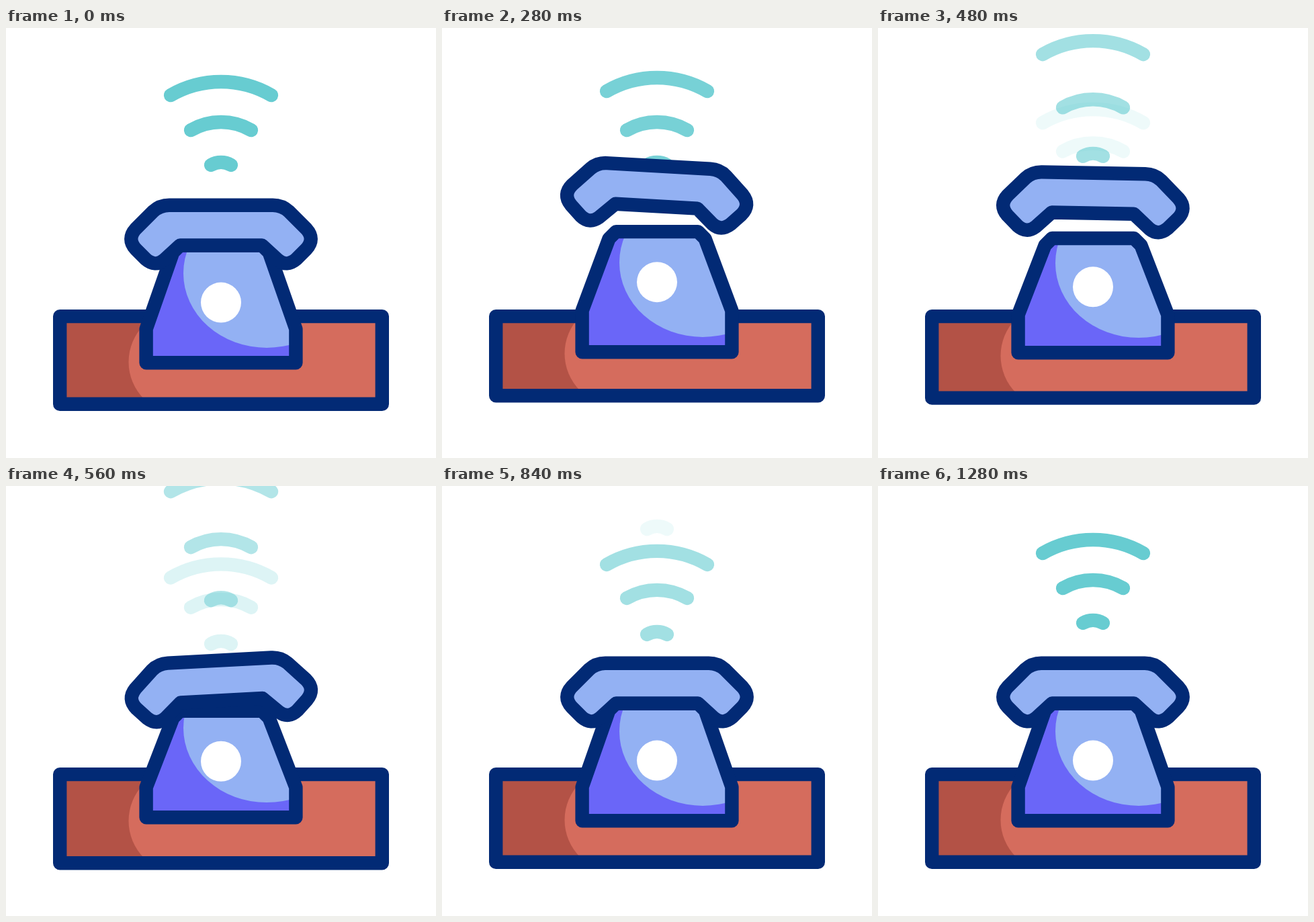
Write an HTML page with a canvas that moves like this. It is 640 px wide and 640 px high and loops after 1.48 s.

```html
<!DOCTYPE html>
<html lang="en">
<head>
<meta charset="utf-8">
<title>Ringing phone</title>
<style>
  html, body { margin: 0; width: 100%; height: 100%; overflow: hidden; background: #fff; }
  canvas { display: block; width: 640px; height: 640px; }
</style>
</head>
<body>
<canvas id="stage" width="640" height="640"></canvas>
<script>
const ctx = document.getElementById('stage').getContext('2d');
const LOOP = 1480, STEP = 40;
const NAVY = '#022a75', BLUE = '#93b1f3', PURPLE = '#6a66f8';
const RED = '#d56c5d', DARK_RED = '#b35246', TEAL = '#67ccd1';

const HANDSET = new Path2D(
  'M243 263.7H397Q411 263.7 421 273L447 299Q460.5 314 447 329L432 344' +
  'Q418 356 405 345.5L381 323.5H259L235 345.5Q222 356 208 344' +
  'L193 329Q179.500 314 193 299L219 273Q229 263.7 243 263.7Z');

const progress = (t, from, to) => Math.min(1, Math.max(0, (t - from) / (to - from)));
const smooth = u => u * u * (3 - 2 * u);
const ease = (t, from, to) => smooth(progress(t, from, to));

// Jump up, sink past the resting place, settle.
function bounce(t, up, down) {
  if (t < 360) return up * ease(t, 160, 360);
  if (t < 640) return up + (down - up) * ease(t, 360, 640);
  return down * (1 - ease(t, 640, 840));
}

// Fill, ellipse of the second colour clipped inside, outline.
function shaded(path, base, light, cx, cy, rx, ry) {
  ctx.fillStyle = base;
  ctx.fill(path);
  ctx.save();
  ctx.clip(path);
  ctx.fillStyle = light;
  ctx.beginPath();
  ctx.ellipse(cx, cy, rx, ry, 0, 0, 2 * Math.PI);
  ctx.fill();
  // The lit side runs on to the right edge.
  ctx.fillRect(cx, cy - 2 * ry, 400, 2 * ry);
  ctx.restore();
  outline(path);
}

function outline(path) {
  ctx.strokeStyle = NAVY;
  ctx.stroke(path);
}

function wave(radius, dy, alpha) {
  if (alpha <= 0) return;
  ctx.globalAlpha = alpha;
  ctx.strokeStyle = TEAL;
  ctx.beginPath();
  ctx.arc(320, 230 + dy, radius, -Math.PI * 2 / 3, -Math.PI / 3);
  ctx.stroke();
  ctx.globalAlpha = 1;
}

function drawWaves(t) {
  [150, 90, 30].forEach((radius, i) => {
    const delay = i * 80;
    const rise = -216 * ease(t, 200 + delay, 1000 + delay);
    wave(radius, rise, 1 - progress(t, 200, 920));
    const start = i ? 34 : 48;
    const end = i ? 1280 : 1240;
    wave(radius, start * (1 - ease(t, 240 + delay, end)), progress(t, 400, 1120));
  });
}

function drawDesk(t) {
  const dy = bounce(t, -19.3, 6.5);
  const desk = new Path2D();
  desk.rect(80.2, 429.1, 479.6, 130.7 + dy);
  ctx.fillStyle = DARK_RED;
  ctx.fill(desk);
  ctx.save();
  ctx.clip(desk);
  ctx.fillStyle = RED;
  ctx.beginPath();
  ctx.arc(260.5, 497 + dy, 78, Math.PI / 2, Math.PI * 1.5);
  ctx.lineTo(570, 419 + dy);
  ctx.lineTo(570, 575 + dy);
  ctx.fill();
  ctx.restore();
  outline(desk);
}

function drawBody(t) {
  const top = 323.5 + bounce(t, -31.5, 22);
  const bend = 448 + bounce(t, -42, 11);
  const drop = bounce(t, -24.7, 0);
  const bottom = 498.2 + drop;
  const body = new Path2D(
    `M208.600 ${bottom}V${bend}L248.500 ${top + 10.5}L259 ${top}H381` +
    `L391.500 ${top + 10.5}L431.400 ${bend}V${bottom}Z`);
  shaded(body, PURPLE, BLUE, 388, 365 + drop, 124, 111);
  ctx.fillStyle = '#fff';
  ctx.beginPath();
  ctx.arc(320, 408.6 + bounce(t, -47, 13), 30, 0, 2 * Math.PI);
  ctx.fill();
}

function drawHandset(t) {
  ctx.save();
  ctx.translate(320, 307 + bounce(t, -90, 17));
  ctx.rotate(bounce(t, 5, -5) * Math.PI / 180);
  ctx.translate(-320, -307);
  ctx.fillStyle = BLUE;
  ctx.fill(HANDSET);
  outline(HANDSET);
  ctx.restore();
}

function draw(now) {
  const t = Math.floor((now % LOOP) / STEP) * STEP;
  ctx.fillStyle = '#fff';
  ctx.fillRect(0, 0, 640, 640);
  ctx.lineWidth = 20.4;
  ctx.lineCap = ctx.lineJoin = 'round';
  drawWaves(t);
  drawDesk(t);
  drawBody(t);
  drawHandset(t);
}

const startTime = performance.now();
function tick() {
  draw(performance.now() - startTime);
  requestAnimationFrame(tick);
}
tick();
</script>
</body>
</html>
```
